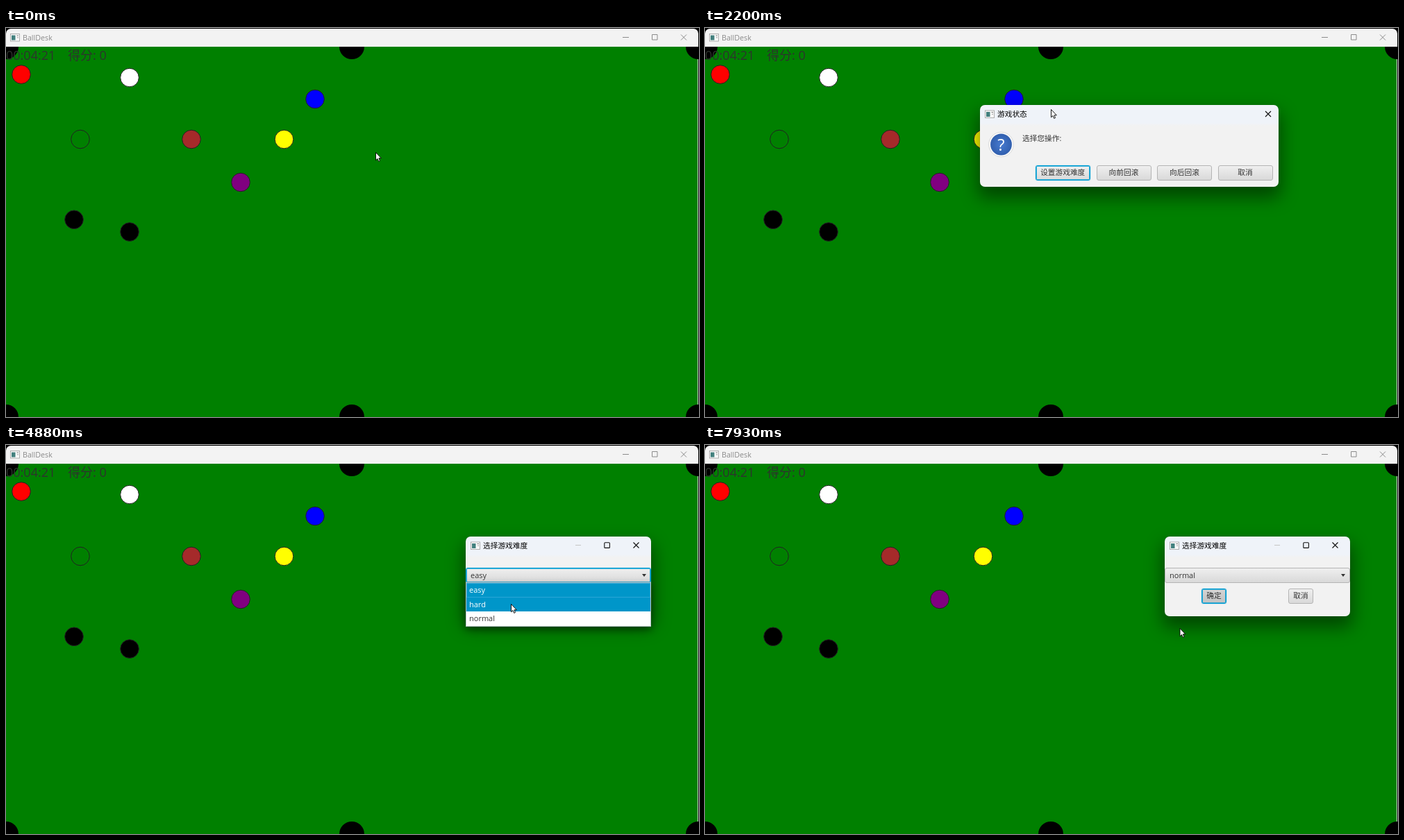
These frames come from a looping animation (998x561 px, 8 s). An HTML page:

```html
<!DOCTYPE html>
<html lang="zh">
<head>
<meta charset="utf-8">
<title>BallDesk</title>
<style>
html, body { margin: 0; width: 100%; height: 100%; overflow: hidden; background: #000; }
body { position: relative; font: 10.7px "Open Sans", "Noto Sans CJK SC", "Noto Sans CJK", sans-serif; color: #333; cursor: default; }
svg { position: absolute; left: 0; top: 0; overflow: visible; }
.text { position: absolute; line-height: 20px; white-space: pre; }
.bar { position: absolute; left: 0; top: 1px; width: 997px; height: 26px; border-radius: 7px 7px 0 0; background: #f3f3f3; color: #8b8b8b; }
.bar.active { background: #eff3f9; color: #111; }
.score { font-size: 18px; color: #2d332d; }
.dialog { position: absolute; left: 0; top: 0; border-radius: 7px; background: linear-gradient(#eff3f9 26px, #f2f2f2 30px);
  box-shadow: 0 0 1px rgba(0,0,0,.6), 0 13px 26px 3px rgba(0,0,0,.45); }
.dialog .title { left: 25px; top: 3px; color: #000; }
#menu { width: 430px; height: 117.5px; }
#level { width: 267px; height: 115px; }
.button, .combo { position: absolute; box-sizing: border-box; border: 1px solid #b4b4b4; border-radius: 3px;
  background: linear-gradient(#efefef, #d9d9d9); text-align: center; height: 21.5px; line-height: 19.5px; }
.focus { border-color: #039ed3; box-shadow: inset 0 0 0 .8px #039ed3, 0 0 1px #039ed3; }
.pressed { background: linear-gradient(#d4d4d4, #c2c2c2); }
.hover { background: linear-gradient(#f8f8f8, #e6e6e6); }
.combo { left: 0; top: 45px; width: 267px; padding-left: 6px; text-align: left; font-size: 11px; }
.combo::after { content: ""; position: absolute; right: 6px; top: 8px; border: 3.6px solid transparent; border-top: 4px solid #333; border-bottom: 0; }
.list { position: absolute; left: 0; top: 66px; width: 267px; height: 64px; box-sizing: border-box; border: 1px solid #b9c4c9;
  background: #fff; box-shadow: 0 4px 10px rgba(0,0,0,.4); font-size: 11px; }
.item { height: 20.67px; line-height: 20.67px; padding-left: 4px; box-sizing: border-box; }
.item.lit { background: #0096c9; color: #fff; }
.item.chosen { box-shadow: inset 0 0 0 1px #2ba6d6; }
</style>
</head>
<body>
<svg id="table" width="998" height="561">
  <rect y="27" width="997" height="534" fill="#008000"/>
  <path d="M996.5 27V561" stroke="#d8e6d8"/>
</svg>
<div class="bar" id="bar">
  <svg width="997" height="26" fill="none" stroke="currentColor">
    <path d="M888 12.5h9M930.5 8.5h7.5v7.5h-7.5zM972 8.5l8 8M980 8.5l-8 8"/>
    <use href="#appIcon" x="6" y="7"/>
  </svg>
  <div class="text" style="left:24px;top:3px">BallDesk</div>
</div>
<div class="text score" style="left:0;top:29px">00:04:21</div>
<div class="text score" style="left:89px;top:29px">得分: 0</div>

<div class="dialog" id="menu">
  <svg width="430" height="117" fill="none" stroke="#111" stroke-width="1.1">
    <path d="M411 9l8 8M419 9l-8 8"/>
    <use href="#appIcon" x="7" y="7.5"/>
    <circle cx="30.5" cy="57" r="17.8" fill="#fafafa" stroke="#d4d4d4" stroke-width=".8"/>
    <circle cx="30.5" cy="57" r="15.4" fill="url(#blue)" stroke="none"/>
    <text x="30.5" y="65.5" font-size="24" text-anchor="middle" fill="#fff" stroke="none">?</text>
  </svg>
  <div class="text title">游戏状态</div>
  <div class="text" style="left:61px;top:37.5px">选择您操作:</div>
  <div class="button focus" style="left:79.5px;top:87px;width:79.5px">设置游戏难度</div>
  <div class="button" style="left:167.5px;top:87px;width:79px">向前回滚</div>
  <div class="button" style="left:255px;top:87px;width:79px">向后回滚</div>
  <div class="button" style="left:342.5px;top:87px;width:79px">取消</div>
</div>

<div class="dialog" id="level">
  <svg width="267" height="115" fill="none" stroke="#111" stroke-width="1.1">
    <path d="M158 12.5h8" stroke="#c6c6c6"/>
    <rect x="199.8" y="8.8" width="7.6" height="7.6" rx="1"/>
    <path d="M241.5 8.5l8 8M249.5 8.5l-8 8"/>
    <use href="#appIcon" x="7" y="7.5"/>
  </svg>
  <div class="text title">选择游戏难度</div>
  <div class="combo" id="combo"></div>
  <div class="button" id="ok" style="left:53px;top:75px;width:36px">确定</div>
  <div class="button" style="left:178px;top:75px;width:36px">取消</div>
  <div class="list" id="list"></div>
</div>

<svg id="pointer" width="10" height="15">
  <path d="M.5 .5V11.8L3 9.5L4.7 13.4L6.5 12.6L4.9 8.8H8.3Z" fill="#fff" stroke="#000" stroke-width=".9"/>
</svg>
<svg width="0" height="0">
  <defs>
    <radialGradient id="blue"><stop offset="0" stop-color="#477bd0"/><stop offset="1" stop-color="#315fae"/></radialGradient>
    <g id="appIcon" stroke="none">
      <rect x=".5" y=".5" width="13" height="10.5" fill="#fafafa" stroke="#a5a5a5" stroke-width=".9"/>
      <rect x="2" y="2.5" width="5.5" height="7" fill="#43807e"/>
      <path d="M9.5 3h2.5M11 5v1.5" stroke="#777" stroke-width="1"/>
    </g>
  </defs>
</svg>

<script>
const $ = id => document.getElementById(id);
const LOOP = 8000;

function circle(cx, cy, r, fill, stroke) {
  const c = document.createElementNS("http://www.w3.org/2000/svg", "circle");
  for (const [k, v] of Object.entries({ cx, cy, r, fill, stroke })) c.setAttribute(k, v);
  $("table").append(c);
}
for (const x of [0, 498, 997]) for (const y of [27, 561]) circle(x, y, 18, "#000", "none");
[[22, 67, "red"], [178, 71.5, "white"], [445, 102.5, "blue"], [107, 160.5, "green"], [267, 160.5, "brown"],
 [400.5, 160.5, "yellow"], [338, 222.5, "purple"], [98, 276.3, "black"], [178, 294, "black"]]
  .forEach(([x, y, color]) => circle(x, y, 13.3, color, "#222"));

const levels = ["easy", "hard", "normal"];
const items = levels.map(name => {
  const item = document.createElement("div");
  item.className = "item";
  item.textContent = name;
  $("list").append(item);
  return item;
});

// Pointer path: time, x, y
const path = [
  [40, 532, 179], [810, 690, 212], [1260, 722, 188.5], [1630, 789, 114], [1870, 789, 114], [2190, 498, 117],
  [2730, 498, 117], [3200, 515, 206], [3360, 515, 206], [3680, 846.5, 121.5], [3720, 846.5, 121.5],
  [3780, 829.5, 121.5], [4220, 739.5, 144.5], [4310, 739.5, 144.5], [4480, 735, 188], [4560, 735, 188],
  [4880, 727, 229], [5290, 727, 231], [5640, 815, 406], [6020, 745.5, 218], [6130, 745.5, 218],
  [6480, 755, 350], [6860, 733, 188], [6980, 733, 188], [7260, 725, 250], [7400, 725, 250],
  [7650, 735, 218], [7750, 735, 218], [7930, 683.5, 264]
];
const clamp = (v, lo, hi) => Math.min(hi, Math.max(lo, v));
const ramp = (t, start, end) => clamp((t - start) / (end - start), 0, 1);
const within = (t, start, end) => t >= start && t < end;

function pointerAt(t) {
  const next = path.findIndex(p => p[0] > t);
  if (next === 0) return path[0].slice(1);
  if (next < 0) return path.at(-1).slice(1);
  const [t0, x0, y0] = path[next - 1], [t1, x1, y1] = path[next];
  const u = ramp(t, t0, t1), e = u * u * (3 - 2 * u);
  return [x0 + (x1 - x0) * e, y0 + (y1 - y0) * e];
}
function place(id, [x, y], dx = 0, dy = 0) {
  $(id).style.transform = `translate(${x - dx}px, ${y - dy}px)`;
}
function show(id, opacity) {
  $(id).style.opacity = opacity;
  $(id).style.visibility = opacity > 0 ? "visible" : "hidden";
}

function render(t) {
  const pointer = pointerAt(t);
  place("pointer", pointer);
  $("bar").classList.toggle("active", within(t, 420, 880));

  // Each dialog follows the pointer while its title bar is dragged
  place("menu", pointerAt(clamp(t, 1870, 2600)), 102, 6);
  show("menu", ramp(t, 870, 990) * (1 - ramp(t, 3500, 3580)));
  place("level", pointerAt(clamp(t, 3700, 4310)), 77.5, 12.5);
  show("level", ramp(t, 3380, 3480));

  const chosen = t < 5170 ? 0 : t < 7360 ? 1 : 2;
  const open = within(t, 4520, 5170) || within(t, 6930, 7360);
  const okFocused = within(t, 6100, 6930) || t >= 7730;
  const hovered = Math.floor((pointer[1] - 198.5) / 20.67);
  $("list").style.display = open ? "" : "none";
  items.forEach((item, i) => {
    item.classList.toggle("lit", i === chosen || i === hovered);
    item.classList.toggle("chosen", i === chosen);
  });
  $("combo").textContent = levels[chosen];
  $("combo").classList.toggle("focus", !okFocused);
  const ok = $("ok").classList;
  ok.toggle("focus", okFocused);
  ok.toggle("pressed", within(t, 6100, 6180) || t >= 7730);
  ok.toggle("hover", within(t, 5960, 6100) || within(t, 7580, 7730));
}

function frame() {
  render(performance.now() % LOOP);
  requestAnimationFrame(frame);
}
frame();
</script>
</body>
</html>
```
